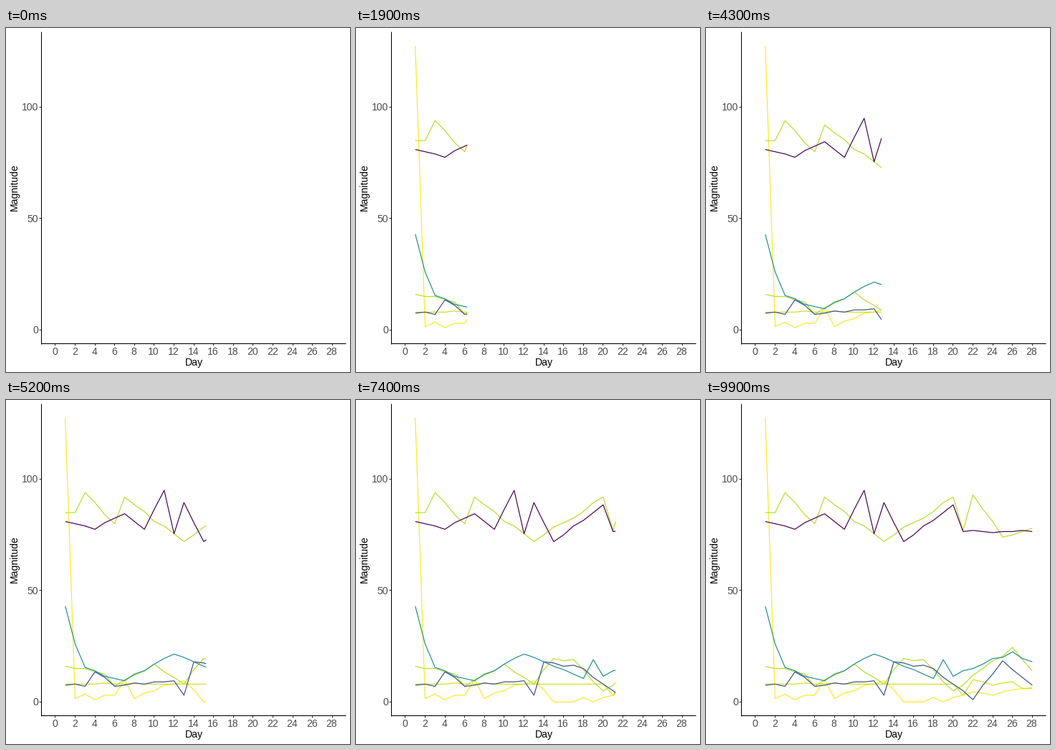
These frames come from a looping animation (480 by 480 pixels, 10 s). A matplotlib script:

```python
import numpy as np
import matplotlib.pyplot as plt
from matplotlib.animation import FuncAnimation

SIZE, DPI = 480, 72
FRAMES, INTERVAL = 100, 100
LEFT, RIGHT, TOP, BOTTOM = 49.5, 474.6, 5.3, 440.6
DAYS = np.arange(1, 29)
# Each day is reached on a whole frame.
ARRIVAL = np.rint((DAYS - 1) * (FRAMES - 1) / 27)
FONT = dict(family="Liberation Sans", fontsize=14, va="baseline")
GREY, TICK = "#4d4d4d", "#333333"

rng = np.random.default_rng(4)
fig = plt.figure(figsize=(SIZE / DPI, SIZE / DPI), dpi=DPI, facecolor="white")
ax = fig.add_axes([0, 0, 1, 1])
ax.set_xlim(0, SIZE)
ax.set_ylim(SIZE, 0)
ax.axis("off")


def px(day):
    return 68.9 + 13.8 * np.asarray(day)


def py(value):
    return 421.3 - 3.108 * np.asarray(value)


def rule(x0, y0, x1, y1, color="black"):
    # Snapping rounds half a pixel up, so shift back.
    ax.plot([x0 - 0.5, x1 - 0.5], [y0 - 0.5, y1 - 0.5], color=color,
            lw=1.07, solid_capstyle="butt", zorder=1)


def draw_axes():
    for day in range(0, 29, 2):
        x = px(day)
        rule(x, BOTTOM, x, BOTTOM + 3, TICK)
        ax.text(x - 0.8, 455.5, str(day), ha="center", color=GREY, **FONT)
    for value in (0, 50, 100):
        y = py(value)
        rule(LEFT - 3, y, LEFT, y, TICK)
        ax.text(45.4, y + 4.7, str(value), ha="right", color=GREY, **FONT)
    rule(LEFT, TOP, LEFT, BOTTOM + 0.5)
    rule(LEFT - 0.5, BOTTOM, RIGHT, BOTTOM)
    ax.text(262.3, 471.4, "Day", ha="center", **FONT)
    ax.text(15.6, 222.3, "Magnitude", rotation=90, rotation_mode="anchor",
            ha="center", **FONT)


def add_series(color, jitter, turns):
    """Join the main turning points, with slight noise on other days."""
    values = np.interp(DAYS, list(turns), list(turns.values()))
    noise = rng.uniform(-jitter, jitter, DAYS.size)
    noise[[day - 1 for day in turns]] = 0
    values = np.maximum(np.round(2 * (values + noise)) / 2, 0)
    line, = ax.plot([], [], color=color, lw=1.2, solid_capstyle="butt",
                    solid_joinstyle="round", snap=False, zorder=2)
    return line, values


draw_axes()
series = [
    add_series("#fde725", 1.5, {1: 127.5, 2: 1.5, 6: 3, 7: 10, 8: 1.5,
                                13: 9.5, 15: 0, 17: 0, 28: 6.5}),
    add_series("#cde11d", 0.3, {1: 8, 20: 8, 21: 3, 22: 10, 24: 7.5,
                                26: 9, 27: 6, 28: 6}),
    add_series("#b5de2b", 0.8, {1: 16, 5: 12.5, 6: 7, 10: 17, 13: 8, 15: 19.5,
                                17: 19, 20: 5, 26: 24.5, 28: 14}),
    add_series("#b5de2b", 1, {1: 85, 2: 85, 3: 94, 6: 80, 7: 92, 13: 72,
                              20: 92, 21: 77, 22: 93, 25: 74, 28: 78}),
    add_series("#21908c", 0.8, {1: 43, 2: 26, 3: 15.5, 7: 9.5, 12: 21.5,
                                18: 10.5, 19: 19, 20: 11.5, 26: 22.5, 28: 18}),
    add_series("#3b528b", 0.8, {1: 7.5, 3: 7, 4: 13.5, 6: 7, 12: 9.5, 13: 3,
                                14: 18, 18: 15, 22: 1, 25: 18.5, 28: 7.5}),
    add_series("#440154", 0.5, {1: 81, 4: 77.5, 7: 84.5, 9: 77.5, 11: 95,
                                12: 75.5, 13: 89.5, 15: 72, 20: 88.5,
                                21: 76.5, 28: 76.5}),
]


def update(frame):
    """Reveal every line up to the current day."""
    now = np.interp(frame, ARRIVAL, DAYS)
    days = np.append(DAYS[DAYS < now], now) if frame else np.array([])
    for line, values in series:
        line.set_data(px(days), py(np.interp(days, DAYS, values)))
    return [line for line, _ in series]


anim = FuncAnimation(fig, update, frames=FRAMES, interval=INTERVAL,
                     repeat=True, repeat_delay=0)
plt.show()
```
